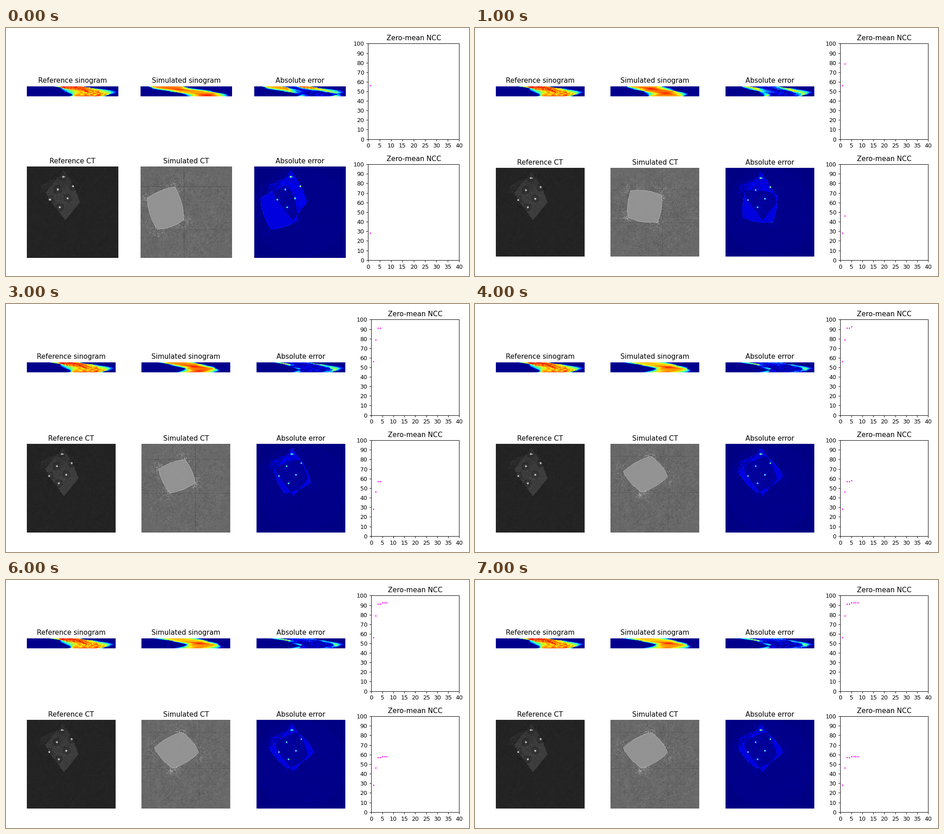
A matplotlib script that plays this animation: 1022x548 px, repeating every 8000 ms.

```python
import numpy as np
import matplotlib.pyplot as plt
from matplotlib.animation import FuncAnimation
from matplotlib.path import Path

W, H = 1022, 548
N, BINS, ANGLES = 200, 180, 20

plt.rcParams.update({
    "font.family": "DejaVu Sans", "font.size": 9.1,
    "axes.titlesize": 10.9, "axes.titlepad": 5.4, "axes.linewidth": 0.73,
    "xtick.major.size": 3.2, "ytick.major.size": 3.2,
    "xtick.major.pad": 3.2, "ytick.major.pad": 3.2,
    "xtick.major.width": 0.73, "ytick.major.width": 0.73,
})

axis = (np.arange(N) + 0.5) / N
X, Y = np.meshgrid(axis, axis)
POINTS = np.column_stack([X.ravel(), Y.ravel()])
CIRCLE = np.hypot(X - 0.5, Y - 0.5) < 0.5

# Corners of the simulated block at each step of the fit
POSES = [
    [(.376, .223), (.475, .587), (.185, .693), (.070, .347)],
    [(.231, .254), (.579, .305), (.528, .613), (.200, .561)],
    [(.492, .177), (.605, .438), (.318, .556), (.195, .285)],
    [(.456, .141), (.651, .367), (.349, .546), (.144, .315)],
]
STEPS = [0, 1, 2, 2, 3, 3, 3, 3]
SINO_SCORE = [56, 79, 91, 91, 92.7, 92.7, 92.7, 92.7]
CT_SCORE = [28, 46, 57, 57, 58, 58, 58, 58]

OUTLINE = [(.40, .04), (.485, .17), (.53, .25), (.58, .39),
           (.42, .59), (.25, .37), (.21, .28), (.31, .15)]
SMUDGE = [(.14, .31), (.16, .20), (.31, .13), (.28, .20)]
WIRES = [(.396, .114), (.337, .252), (.505, .218),
         (.252, .361), (.445, .347), (.358, .446)]


def inside(corners):
    return Path(corners).contains_points(POINTS).reshape(N, N).astype(float)


def blob(x, y, r):
    return np.exp(-((X - x) ** 2 + (Y - y) ** 2) / (2 * r * r))


def bulged(corners, amount=0.07):
    """Closed outline whose sides bow outwards."""
    pts = np.array(corners)
    mid = pts.mean(axis=0)
    t = np.linspace(0, 1, 16, endpoint=False)[:, None]
    out = []
    for a, b in zip(pts, np.roll(pts, -1, axis=0)):
        normal = np.array([b[1] - a[1], a[0] - b[0]])
        if normal @ ((a + b) / 2 - mid) < 0:
            normal = -normal
        out.append(a + (b - a) * t + normal * amount * 4 * t * (1 - t))
    return np.vstack(out)


def streaks(seed, count=24):
    """Noise smeared along many directions, as in back projection."""
    rng = np.random.default_rng(seed)
    total = np.zeros((N, N))
    for a in np.linspace(0, np.pi, count, endpoint=False):
        s = (X - 0.5) * np.cos(a) + (Y - 0.5) * np.sin(a)
        total += rng.normal(size=300)[((s + 0.75) * 200).astype(int)]
    return total / np.sqrt(count)


def detector(x, y, a):
    return 0.5 + 1.02 * ((x - 0.5) * np.cos(a) - (y - 0.5) * np.sin(a))


def sinogram(density, angles, peak, power):
    kernel = np.array([1, 2, 3, 2, 1]) / 9
    rows = []
    for a in angles:
        s = np.clip(detector(X, Y, a) * BINS, 0, BINS - 1).astype(int)
        row = np.bincount(s.ravel(), density.ravel(), BINS)
        rows.append(np.convolve(row, kernel, "same"))
    rows = np.array(rows)
    return 0.012 + peak * (rows / rows.max()) ** power


def make_reference():
    rng = np.random.default_rng(4)
    body = inside(OUTLINE)
    smudge = inside(SMUDGE) * (1 - body)
    noise = streaks(1)
    holes = np.zeros((N, N))
    wires = np.zeros((N, N))
    halo = np.zeros((N, N))
    for x, y in WIRES:
        holes = np.maximum(holes, np.hypot(X - x, Y - y) < 0.048)
        wires += blob(x, y, 0.0065)
        halo += blob(x, y, 0.06)
    wires += 0.5 * blob(0.412, 0.114, 0.005)
    shade = np.clip(0.55 + 2 * (Y - 0.08), 0.55, 1)
    solid = body * shade * (1 - 0.45 * holes)
    grey = (0.14 + 0.10 * solid + 0.035 * smudge * np.abs(noise)
            + noise * (0.006 + 0.012 * halo) + 0.8 * wires)
    level = (0.085 * body * (1 - 0.2 * holes)
             + 0.05 * smudge * np.abs(noise)
             + body * noise * 0.022 + 0.6 * wires)

    angles = np.radians(np.linspace(14, 158, ANGLES))
    sino = sinogram(body * (1 - 0.2 * holes), angles, 0.93, 0.5)
    cols = (np.arange(BINS) + 0.5) / BINS
    strong = np.clip(sino * 1.6 - 0.4, 0, 1)
    for x, y in WIRES:
        s = detector(x, y, angles)[:, None]
        sino += 0.10 * np.exp(-((cols - s) / 0.007) ** 2)
        for side in (-0.045, 0.045):
            sino -= 0.07 * np.exp(-((cols - s - side) / 0.008) ** 2)
    sino += 0.03 * strong * rng.normal(size=sino.shape)
    return np.clip(grey, 0, 1), level, np.clip(sino, 0, 0.95)


def make_simulation(corners, seed):
    rng = np.random.default_rng(seed)
    shape = bulged(corners)
    body = inside(shape)
    core = body.copy()
    for step in (-1, 1):
        for ax in (0, 1):
            core = np.minimum(core, np.roll(body, step, ax))
    edge = (body - core) * rng.uniform(0.1, 1, (N, N))
    noise = streaks(seed)
    flare = sum(blob(x, y, 0.05) for x, y in corners)
    ripple = noise * (0.014 + 0.010 * CIRCLE + 0.05 * flare) * (1 - 0.9 * body)

    right = shape[:, 0].max()
    top, bottom = shape[:, 1].min(), shape[:, 1].max()
    lines = np.zeros((N, N))
    for dist in (X - right, Y - top, Y - bottom):
        lines = np.maximum(lines, np.abs(dist) < 0.0026)
    grey = (0.41 + 0.165 * body + 0.20 * edge + ripple
            + 0.06 * flare * (1 - body) * np.abs(noise)
            - 0.05 * lines * (1 - body))
    level = 0.078 * body + 0.13 * edge ** 2 + 0.2 * ripple
    angles = np.radians(np.linspace(1, 174, ANGLES))
    return np.clip(grey, 0, 1), level, sinogram(body, angles, 0.88, 0.7)


REF_CT, REF_LEVEL, REF_SINO = make_reference()


def build(step):
    ct, level, sino = make_simulation(POSES[step], 20 + step)
    sino_err = 0.012 + 0.95 * np.abs(REF_SINO - sino) ** 1.1
    ct_err = 0.003 + 0.004 * CIRCLE + np.abs(REF_LEVEL - level)
    return [REF_SINO, sino, sino_err, REF_CT, ct, ct_err]


PICTURES = [build(k) for k in range(len(POSES))]

fig = plt.figure(figsize=(W / 100, H / 100), dpi=100, facecolor="white")


def place(ax, x, y, w, h):
    ax.set_position([x / W, 1 - (y + h) / H, w / W, h / H])


def image_axes(title, cmap, shape):
    ax = fig.add_axes([0, 0, 0.1, 0.1], label=f"{title} {shape}")
    im = ax.imshow(np.zeros(shape), cmap=cmap, vmin=0, vmax=1,
                   aspect="auto", interpolation="nearest")
    ax.set_title(title)
    ax.axis("off")
    return ax, im


def score_axes(name):
    ax = fig.add_axes([0, 0, 0.1, 0.1], label=name)
    ax.set(xlim=(0, 40), ylim=(0, 100), title="Zero-mean NCC",
           xticks=range(0, 41, 5), yticks=range(0, 101, 10))
    dots, = ax.plot([], [], "o", color="magenta", ms=1.1, mew=0.9)
    return ax, dots


SINO_SHAPE, CT_SHAPE = (ANGLES, BINS), (N, N)
panels = [
    image_axes("Reference sinogram", "jet", SINO_SHAPE),
    image_axes("Simulated sinogram", "jet", SINO_SHAPE),
    image_axes("Absolute error", "jet", SINO_SHAPE),
    image_axes("Reference CT", "gray", CT_SHAPE),
    image_axes("Simulated CT", "gray", CT_SHAPE),
    image_axes("Absolute error", "jet", CT_SHAPE),
]
scores = [score_axes("sino score"), score_axes("ct score")]


def layout(first):
    """The first picture has slightly wider columns than the rest."""
    size, pitch, left = (201.7, 251, 799.4) if first else (195.6, 253.3, 806.4)
    for k, (ax, _) in enumerate(panels):
        height, mid = (size / 9, 139.8) if k < 3 else (size, 407)
        place(ax, 46.1 + pitch * (k % 3), mid - height / 2, size, height)
    for (ax, _), (top, bottom) in zip(scores, ((34.4, 245.6), (301, 512.8))):
        place(ax, left, top, 1000.4 - left, bottom - top)


def update(i):
    layout(i == 0)
    for (_, im), data in zip(panels, PICTURES[STEPS[i]]):
        im.set_data(data)
    for (_, dots), values in zip(scores, (SINO_SCORE, CT_SCORE)):
        dots.set_data(range(1, i + 2), values[:i + 1])
    return []


anim = FuncAnimation(fig, update, frames=len(STEPS), interval=1000,
                     init_func=lambda: update(0), repeat=True, repeat_delay=0,
                     blit=False)
plt.show()
```
